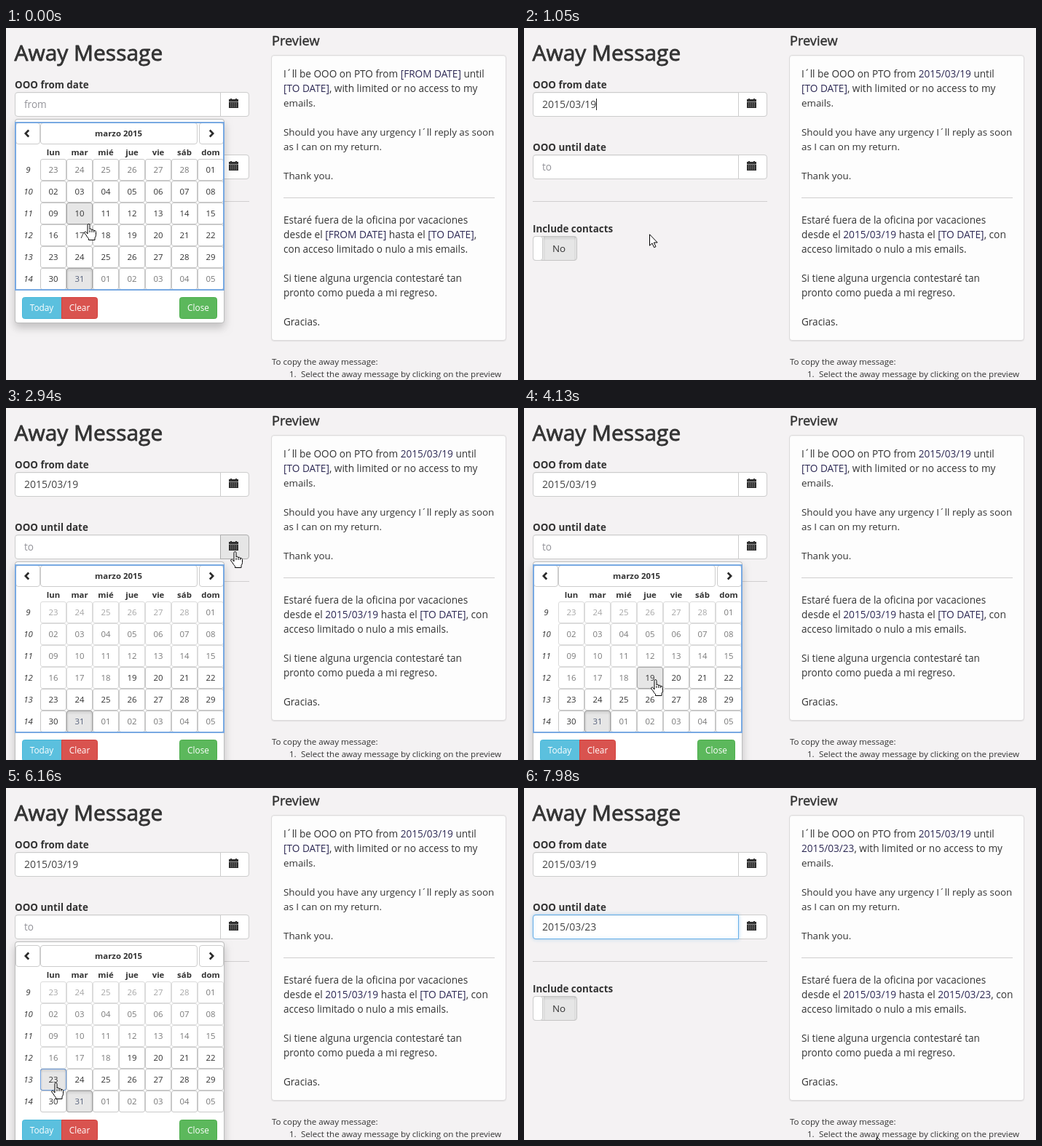
Recreate the animation shown at these times as an HTML page with a canvas. Size 703 px wide and 484 px high, loop 8 s.

```html
<!DOCTYPE html>
<html lang="en">
<head>
<meta charset="utf-8">
<title>Away Message</title>
<style>
html, body { margin: 0; width: 100%; height: 100%; overflow: hidden; background: #f4f2f3; }
canvas { display: block; width: 703px; height: 484px; }
</style>
</head>
<body>
<canvas id="stage"></canvas>
<script>
const W = 703, H = 484, LOOP = 8000, STEP = 70;
const cv = document.getElementById('stage');
const dpr = window.devicePixelRatio || 1;
cv.width = W * dpr;
cv.height = H * dpr;
const c = cv.getContext('2d');
const FONT = '"Open Sans", "Noto Sans", sans-serif';
const INK = '#333', MUTED = '#777', DATE = '#2e2a55', BLUE = '#66afe9';
const CLOSE_1 = 1050, OPEN_2 = 2380, CLOSE_2 = 6230;

// pointer hot spot: time, x, y
const PATH = [
  [0, 112, 269], [70, 113, 284], [140, 116, 304], [210, 116, 304], [630, 172, 283],
  [1540, 172, 283], [2030, 315, 194], [2870, 315, 194], [2940, 313, 197],
  [3290, 262, 340], [3430, 215, 378], [3640, 124, 376], [3710, 124, 376],
  [4130, 179, 373], [4550, 225, 373], [4760, 225, 373], [5040, 266, 371],
  [5320, 266, 371], [5880, 67, 405], [6580, 67, 405], [6650, 67, 403],
  [6790, 67, 403], [7210, 103, 402], [7560, 103, 402], [7980, 484, 479]
];

const clamp = v => Math.max(0, Math.min(1, v));
const inside = (p, x, y, w, h) => p.x >= x && p.x < x + w && p.y >= y && p.y < y + h;

function pointer(t) {
  let i = 1;
  while (i < PATH.length - 1 && PATH[i][0] < t) i++;
  const [t0, x0, y0] = PATH[i - 1], [t1, x1, y1] = PATH[i];
  const k = clamp((t - t0) / (t1 - t0));
  const e = k * k * (3 - 2 * k);
  return { x: Math.round(x0 + (x1 - x0) * e), y: Math.round(y0 + (y1 - y0) * e) };
}

function text(s, x, y, size, color = INK, style = '', align = 'left') {
  c.font = `${style} ${size}px ${FONT}`;
  c.fillStyle = color;
  c.textAlign = align;
  c.fillText(s, x, y);
}

// medium weight: regular glyphs with a thin outline
function heading(s, x, y, size, weight) {
  text(s, x, y, size);
  c.strokeStyle = INK;
  c.lineWidth = weight;
  c.lineJoin = 'round';
  c.strokeText(s, x, y);
}

function box(x, y, w, h, fill, line, r = 3.5) {
  c.beginPath();
  c.roundRect(x + .5, y + .5, w - 1, h - 1, r);
  if (fill) { c.fillStyle = fill; c.fill(); }
  if (line) { c.strokeStyle = line; c.lineWidth = 1; c.stroke(); }
}

function shadow(color, blur, dy, draw) {
  c.save();
  c.shadowColor = color;
  c.shadowBlur = blur * dpr;
  c.shadowOffsetY = dy * dpr;
  draw();
  c.restore();
}

// darker inner edge of a pressed button
function inset(x, y, w, h) {
  const g = c.createLinearGradient(0, y, 0, y + 6);
  g.addColorStop(0, 'rgba(0,0,0,.11)');
  g.addColorStop(1, 'rgba(0,0,0,0)');
  c.fillStyle = g;
  c.fillRect(x + 1, y + 1, w - 2, 6);
  c.fillStyle = 'rgba(0,0,0,.04)';
  c.fillRect(x + 1, y + 1, 2, h - 2);
  c.fillRect(x + w - 3, y + 1, 2, h - 2);
}

function rule(x0, x1, y) {
  c.fillStyle = '#d0cecf';
  c.fillRect(x0, y, x1 - x0, 1);
}

function calendarIcon(x, y) {
  c.fillStyle = '#2f2f2f';
  c.fillRect(x + 2, y, 2, 2);
  c.fillRect(x + 9, y, 2, 2);
  c.fillRect(x, y + 1, 13, 12);
  c.fillStyle = '#999';
  c.fillRect(x, y + 4, 13, 1);
  for (let r = 0; r < 3; r++)
    for (let k = 0; k < 4; k++) c.fillRect(x + 2 + k * 2.6, y + 6 + r * 2.2, 1.2, 1);
}

function field(y, value, hint, glow, caret, hover) {
  box(12, y, 322, 34, '#fff', '#ccc');
  c.save();
  c.beginPath();
  c.roundRect(294, y, 40, 34, [0, 4, 4, 0]);
  c.clip();
  box(294, y, 40, 34, hover ? '#e6e6e6' : '#fff', hover ? '#adadad' : '#ccc', [0, 3.5, 3.5, 0]);
  c.restore();
  calendarIcon(306, y + 9);
  if (glow > 0) {
    c.save();
    c.globalAlpha = glow;
    shadow('rgba(102,175,233,.45)', 5, 0, () =>
      box(12, y, 283, 34, '#fff', BLUE, [3.5, 0, 0, 3.5]));
    c.restore();
  }
  c.fillStyle = 'rgba(0,0,0,.05)';
  c.fillRect(14, y + 1, 280, 1);
  text(value || hint, 25, y + 22, value ? 14 : 13.6, value ? '#444' : '#939399');
  if (caret) {
    c.fillStyle = '#222';
    c.fillRect(99, y + 9, 1, 16);
  }
}

function line(y, size, ...parts) {
  let x = 381;
  parts.forEach((s, i) => {
    text(s, x, y, size, i % 2 ? DATE : INK);
    x += c.measureText(s).width;
  });
}

function preview(from, to) {
  heading('Preview', 365, 24, 18.2, .45);
  shadow('rgba(0,0,0,.05)', 1, 1, () => box(364, 37, 323, 393, '#fdfdfd', '#dcdadb'));
  const a = from || '[FROM DATE]', b = to || '[TO DATE]', en = 13.35, es = 13.55;
  line(68, 13.6, 'I´ll be OOO on PTO from ', a, ' until');
  line(88, 13.65, '', b, ', with limited or no access to my');
  line(108, en, 'emails.');
  line(148, en, 'Should you have any urgency I´ll reply as soon');
  line(168, en, 'as I can on my return.');
  line(208, en, 'Thank you.');
  rule(381, 671, 233);
  line(269, es, 'Estaré fuera de la oficina por vacaciones');
  line(289, 13.75, 'desde el ', a, ' hasta el ', b, from ? ', con' : ',');
  line(309, es, (from ? '' : 'con ') + 'acceso limitado o nulo a mis emails.');
  line(349, es, 'Si tiene alguna urgencia contestaré tan');
  line(369, es, 'pronto como pueda a mi regreso.');
  line(409, es, 'Gracias.');
  text('To copy the away message:', 365, 463, 11.55);
  text('1.', 389, 480, 11.55);
  text('Select the away message by clicking on the preview', 405, 480, 11.6);
}

function chevron(x, y, dir) {
  c.strokeStyle = '#2b2b2b';
  c.lineWidth = 2.6;
  c.lineJoin = 'miter';
  c.beginPath();
  c.moveTo(x - 2.2 * dir, y - 4.5);
  c.lineTo(x + 2.2 * dir, y);
  c.lineTo(x - 2.2 * dir, y + 4.5);
  c.stroke();
}

// cells count from 23 February 2015; index 24 is 19 March
const cellX = i => 47 + (i % 7) * 36;
const cellY = (i, top) => top + 55 + Math.floor(i / 7) * 30;

function hoveredCell(p, top, min) {
  for (let i = min; i < 42; i++)
    if (inside(p, cellX(i), cellY(i, top), 36, 30)) return i;
  return -1;
}

function dayCell(i, top, min, hover, pressed) {
  const x = cellX(i), y = cellY(i, top);
  const day = new Date(2015, 1, 23 + i);
  const today = i === 36;
  const dark = today || i === hover;
  c.save();
  if (i < min) c.globalAlpha = .65;
  box(x, y, 36, 30, dark ? '#e6e6e6' : '#fff', dark ? '#a5a5a5' : '#c8c8c8', 2.5);
  if (today || i === pressed) inset(x, y, 36, 30);
  if (i === pressed) box(x, y, 36, 30, null, '#6d9fe0', 2);
  const color = today ? '#55607a' : day.getMonth() === 2 ? INK : MUTED;
  text(String(day.getDate()).padStart(2, '0'), x + 18, y + 19, 11.4, color, '', 'center');
  c.restore();
}

function popup(top, min, p, pressed) {
  shadow('rgba(0,0,0,.2)', 12, 6, () => box(12, top, 288, 281, '#fff', '#bbb'));
  box(12, top, 288, 281, '#fff', '#bdbdbd');
  const hy = top + 5;
  const heads = [[13, 34], [47, 216], [265, 34]];
  let over = false;
  for (const [x, w] of heads) {
    const hit = inside(p, x, hy, w, 30);
    over = over || hit;
    box(x, hy, w, 30, hit ? '#e6e6e6' : '#fff', '#ccc');
  }
  chevron(29, hy + 15, -1);
  chevron(282, hy + 15, 1);
  text('marzo 2015', 154.5, hy + 19, 11.4, INK, 'bold', 'center');
  ['lun', 'mar', 'mié', 'jue', 'vie', 'sáb', 'dom'].forEach((d, i) =>
    text(d, 65 + i * 36, top + 50, 11.4, INK, 'bold', 'center'));
  for (let w = 0; w < 6; w++)
    text(9 + w, 30.5, top + 74 + w * 30, 11.4, INK, 'italic', 'center');
  const hover = hoveredCell(p, top, min);
  for (let i = 0; i < 42; i++) dayCell(i, top, min, hover, pressed);
  if (pressed < 0) {
    c.strokeStyle = '#78a9e2';
    c.lineWidth = 2;
    c.strokeRect(13, top + 5, 286, 230);
  }
  const by = top + 245;
  box(22, by, 55, 30, '#5bc0de', '#46b8da', [3, 0, 0, 3]);
  box(76, by, 50, 30, '#d9534f', '#d43f3a', [0, 3, 3, 0]);
  box(238, by, 52, 30, '#5cb85c', '#4cae4c', 3);
  text('Today', 49, by + 19, 11.8, '#fff', '', 'center');
  text('Clear', 101, by + 19, 11.8, '#fff', '', 'center');
  text('Close', 264, by + 19, 11.8, '#fff', '', 'center');
  return hover >= 0 || over;
}

const HAND = new Path2D('M5 14V2.2Q5 .5 6.5 .5T8 2.2V8Q8.4 7 9.6 7.2T11 9Q11.5 8 12.6 8.3T13.8 10' +
  'Q14.4 9.2 15.4 9.6T16.5 11.5V15.5Q16.4 18 15 19.5V22.5H6.5V20.5Q4.6 18.8 3 15.8L.8 13' +
  'Q.3 11.8 1.4 11.2T3.4 11.9L5 14Z');
const ARROW = new Path2D('M.5 .8V16.2L4 12.9L6.6 18.7L9 17.7L6.4 12H11.2Z');

function drawPointer(p, hand) {
  c.save();
  c.translate(p.x - (hand ? 5 : 0), p.y);
  c.fillStyle = '#fff';
  c.strokeStyle = '#000';
  c.lineWidth = 1;
  c.lineJoin = 'round';
  const shape = hand ? HAND : ARROW;
  c.fill(shape);
  c.stroke(shape);
  if (hand) {
    c.beginPath();
    for (const x of [8, 11, 13.8]) { c.moveTo(x, 9); c.lineTo(x, 12); }
    c.stroke();
  }
  c.restore();
}

const blink = (t, start, first, second, end) =>
  (t >= start && t < first) || (t >= second && t < end);

function render(now) {
  const t = Math.floor((now % LOOP) / STEP) * STEP;
  const p = pointer(t);
  c.setTransform(dpr, 0, 0, dpr, 0, 0);
  c.fillStyle = '#f4f2f3';
  c.fillRect(0, 0, W, H);

  const from = t >= CLOSE_1 ? '2015/03/19' : '', to = t >= CLOSE_2 ? '2015/03/23' : '';
  const glow1 = clamp((t - CLOSE_1) / 180) * (1 - clamp((t - 2240) / 180));
  const glow2 = clamp((t - CLOSE_2) / 180);
  const over1 = inside(p, 294, 88, 40, 34), over2 = inside(p, 294, 174, 40, 34);

  heading('Away Message', 11.5, 45, 29.9, .8);
  text('OOO from date', 12, 83, 13.4, INK, 'bold');
  field(88, from, 'from', glow1, blink(t, CLOSE_1, 1610, 2170, 2310), over1);
  text('OOO until date', 12, 169, 13.4, INK, 'bold');
  field(174, to, 'to', glow2, blink(t, CLOSE_2, 6860, 7350, 7910), over2);
  rule(12, 334, 238);
  text('Include contacts', 12, 281, 13.4, INK, 'bold');
  box(12, 286, 61, 34, '#e6e6e6', '#c4c4c4');
  inset(26, 286, 46, 34);
  box(12, 286, 14, 34, '#fff', '#ccc');
  text('No', 48, 308, 13.4, INK, '', 'center');
  preview(from, to);

  let hand = over1 || over2;
  if (t < CLOSE_1) hand = popup(125, 0, p, t >= 980 ? 24 : -1) || hand;
  else if (t >= OPEN_2 && t < CLOSE_2) hand = popup(211, 24, p, t >= 6160 ? 28 : -1) || hand;
  drawPointer(p, hand);
}

function tick() {
  render(performance.now());
  requestAnimationFrame(tick);
}
tick();
</script>
</body>
</html>
```
